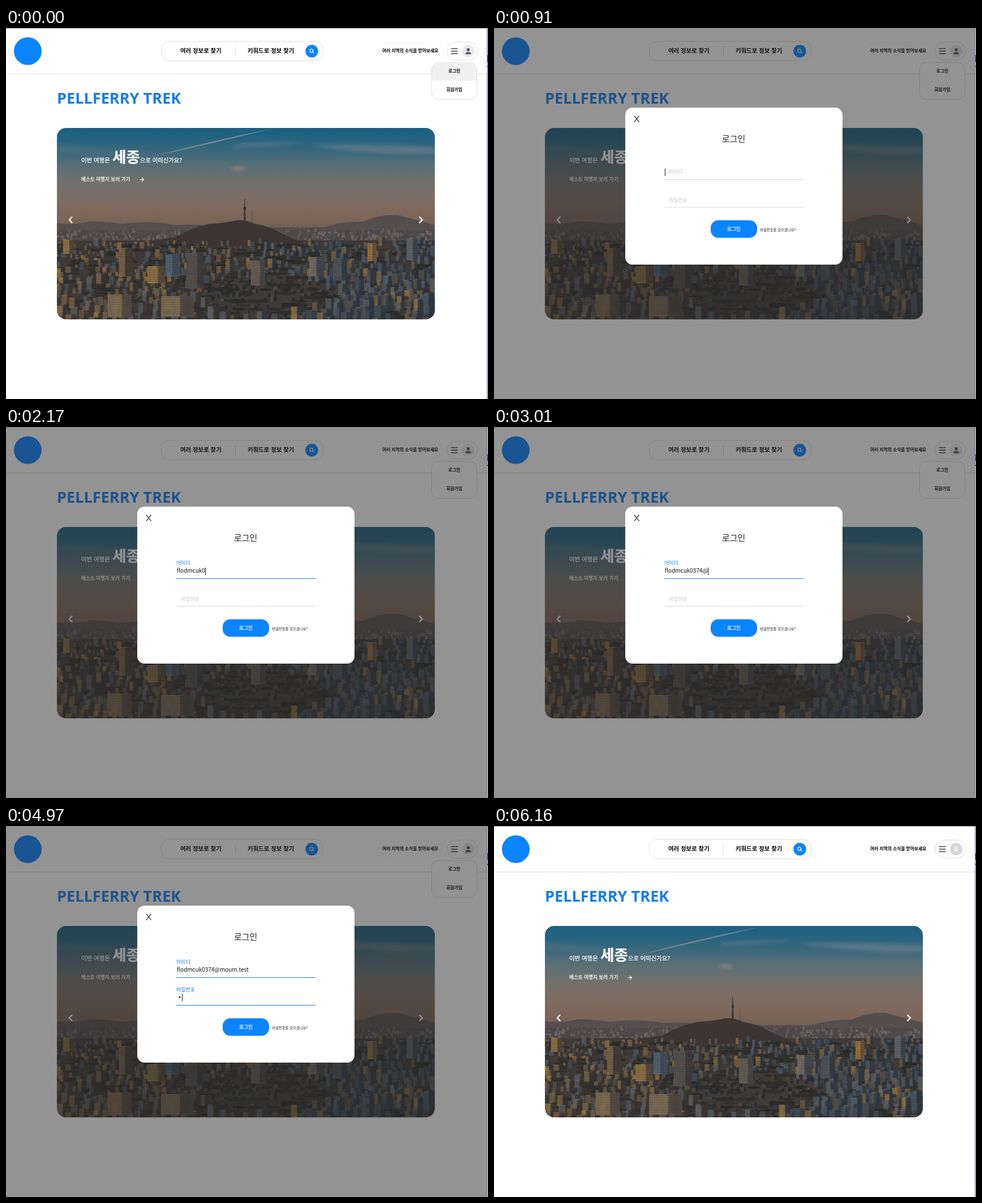
An HTML page with a canvas for the animation above (6230 ms loop, 852 by 657 pixels).

```html
<!DOCTYPE html>
<html lang="ko">
<head>
<meta charset="utf-8">
<style>
html, body { margin: 0; width: 100%; height: 100%; overflow: hidden; background: #fff; }
canvas { position: absolute; left: 90px; top: 177px; border-radius: 16px; }
svg { position: absolute; left: 0; top: 0; font-family: "Noto Sans CJK KR", "Noto Sans", sans-serif; }
.box { fill: #fff; stroke: #dedede; }
.mid { text-anchor: middle; }
.b { font-weight: 700; }
.m { stroke: #000; stroke-width: .25px; }
.white { fill: #fff; }
.white.m { stroke: #fff; }
.line { fill: none; stroke-linecap: round; stroke-linejoin: round; }
</style>
</head>
<body>
<canvas id="photo" width="668" height="339"></canvas>
<svg width="852" height="657" viewBox="0 0 852 657">
  <!-- header -->
  <path d="M0 81.5H850" stroke="#dcdcdc"/>
  <circle cx="38.5" cy="41" r="24.5" fill="#0a84ff"/>
  <rect class="box" x="274.5" y="23.5" width="286" height="34.5" rx="14"/>
  <path d="M405.5 32V50" stroke="#dcdcdc"/>
  <g class="b" font-size="10.4">
    <text x="308" y="44">여러 정보로 찾기</text>
    <text x="427" y="44">키워드로 정보 찾기</text>
  </g>
  <circle cx="540.5" cy="41" r="11.2" fill="#0a84ff"/>
  <g class="line" stroke="#fff" stroke-width="1.2">
    <circle cx="539.8" cy="40.2" r="2.9"/><path d="M542 42.4L544.3 44.7"/>
  </g>
  <rect x="656.5" y="26.5" width="115" height="29" rx="14" fill="#fff" stroke="#f7f7f7"/>
  <text class="b" x="665" y="43.3" font-size="7.75">여러 지역의 소식을 받아보세요</text>
  <rect class="box" x="779.5" y="25" width="54" height="32" rx="16"/>
  <path class="line" d="M787 36.5H798M787 41H798M787 45.5H798" stroke="#40404a" stroke-width="1.3"/>
  <circle id="avatar" cx="817" cy="41" r="11"/>
  <g id="guest" fill="#55555f">
    <circle cx="817" cy="38.4" r="2.7"/>
    <path d="M812.2 46.5v-1.3q0-2.8 4.8-2.8t4.8 2.8v1.3z"/>
  </g>
  <text id="member" class="mid b white" x="817" y="44.2" font-size="8.5">봄</text>
  <g id="menu">
    <rect class="box" x="752.5" y="61" width="80" height="65.5" rx="12"/>
    <path id="hover" d="M753 93V73q0-11.5 11.5-11.5h56q11.5 0 11.5 11.5V93z" fill="#f0f0f0"/>
    <g class="mid b" font-size="7.6">
      <text x="792.5" y="79.4">로그인</text><text x="792.5" y="112.2">회원가입</text>
    </g>
  </g>

  <!-- hero -->
  <text class="b" x="90" y="133.5" font-size="27.1" fill="#147cec" style="font-family:'Noto Sans',sans-serif">PELLFERRY TREK</text>
  <g class="white m">
    <text x="133" y="237.7" font-size="10.4">이번 여행은</text>
    <text class="b" x="188" y="238" font-size="26.7">세종</text>
    <text x="237" y="237.7" font-size="10.3">으로 어떠신가요?</text>
    <text x="133" y="271.3" font-size="8.6">베스트 여행지 보러 가기</text>
  </g>
  <g class="line" stroke="#fff">
    <path d="M237 268.5H243M240.5 265.7L243.3 268.5L240.5 271.3" stroke-width="1.2"/>
    <path d="M116.5 335L111.7 339.8L116.5 344.6M731.2 335L736 339.8L731.2 344.6" stroke-width="2.2"/>
  </g>

  <!-- login dialog -->
  <g id="dialog">
    <rect y="1" width="850" height="656" fill="#282828" opacity=".5"/>
    <rect x="232" y="141" width="384" height="278" rx="13" fill="#fff"/>
    <path d="M248 155.5L256.5 166.5M256.5 155.5L248 166.5" stroke="#444" stroke-width="1.4"/>
    <text class="mid" x="423.7" y="201.5" font-size="15" fill="#222">로그인</text>
    <path id="rule0" d="M301 268.4H547"/>
    <path id="rule1" d="M301 317.4H547"/>
    <text id="label0" font-size="9.1">아이디</text>
    <text id="label1" font-size="9">비밀번호</text>
    <text id="mail" x="302" y="258.3" font-size="10" fill="#111"></text>
    <g id="dots" fill="#111"></g>
    <path id="caret" stroke="#111"/>
    <rect x="383" y="340.5" width="82" height="31" rx="13.5" fill="#0a84ff"/>
    <text class="mid m white" x="424" y="358.7" font-size="8.7">로그인</text>
    <text x="470" y="360.4" font-size="6.4" fill="#222">비밀번호를 잊으셨나요?</text>
  </g>

  <!-- window edges -->
  <path d="M0 .5H852" stroke="#8e8e8e"/>
  <path d="M850.5 1V657" stroke="#756f80"/>
  <path d="M851.5 1V657" stroke="#d3cfd9"/>
  <path d="M851.5 48V60M851.5 67V69" stroke="#44404c"/>
</svg>
<script>
const $ = id => document.getElementById(id);

function paintPhoto() {
  const c = $('photo').getContext('2d');
  let seed = 11;
  const rnd = () => (seed = (seed * 16807) % 2147483647) / 2147483647;
  const pick = list => list[Math.floor(rnd() * list.length)];
  const rect = (x, y, w, h, color) => { c.fillStyle = color; c.fillRect(x, y, w, h); };
  const shape = (d, color) => { c.fillStyle = color; c.fill(new Path2D(d)); };
  c.translate(-90, -177);

  const sky = c.createLinearGradient(0, 177, 0, 365);
  ['#1d6081', '#28647f', '#40697b', '#5d6f75', '#70706d', '#7b6e66', '#7f6a5d', '#796456', '#665852']
    .forEach((color, i) => sky.addColorStop(i / 8, color));
  rect(90, 177, 668, 339, sky);

  // clouds and vapour trail
  c.filter = 'blur(3px)';
  shape('M540 208Q610 204 758 211V222Q690 226 640 219Q590 217 540 208Z', 'rgba(125,136,146,.5)');
  shape('M400 207Q460 200 530 203Q470 210 400 212Z', 'rgba(120,134,146,.45)');
  shape('M396 249Q410 240 424 250Q412 256 396 249Z', 'rgba(150,138,128,.7)');
  shape('M90 206Q180 215 300 223Q170 228 90 219Z', 'rgba(95,118,132,.35)');
  c.filter = 'none';
  shape('M250 230Q360 200 468 179Q370 203 250 230Z', '#7c878f');

  // distant ridges and haze
  shape('M90 346Q120 350 150 342Q180 343 205 347Q250 340 300 349Q350 347 400 353L560 353Q595 342 632 343Q662 329 692 331Q720 338 758 349V375H90Z', '#554e4e');
  rect(90, 358, 668, 160, '#4d4848');
  for (let i = 0; i < 420; i++) {
    const h = 2 + rnd() * 6;
    rect(90 + rnd() * 668, 378 - h - rnd() * 17, 2 + rnd() * 3, h, pick(['#625b5a', '#585253', '#6b6462', '#4d494a']));
  }
  rect(90, 376, 668, 140, '#3d3a38');

  // hill and tower
  shape('M180 386Q250 380 300 370Q328 353 360 347Q390 345 405 341Q423 338 440 347Q468 351 488 364Q510 376 550 386Z', '#3c3533');
  shape('M421.6 302h.8l.5 15h1.4v5h-1l.5 19h-3.6l.5-19h-1v-5h1.4z', '#393537');
  rect(435, 323, .8, 24, '#514848');

  function tower(x, base, w, h, lit, dark) {
    const side = w * (.35 + rnd() * .25), top = base - h;
    rect(x, top, w - side, h, lit);
    rect(x + w - side, top, side, h, dark);
    c.fillStyle = 'rgba(25,27,32,.33)';
    for (let y = top + 2; y < base - 1; y += 3) c.fillRect(x + 1, y, w - 2, 1);
  }

  const warm = ['#8d7042', '#a38046', '#776346', '#846b4d', '#66594b'];
  const cool = ['#57606a', '#62646a', '#4b5661', '#6b6864', '#5c564f'];
  c.globalAlpha = .7;
  for (let y = 386; y < 540; y += 7) {
    const near = (y - 380) / 150;
    for (let x = 84 + rnd() * 8; x < 758;) {
      const w = 5 + near * 9 + rnd() * 8, right = (x - 90) / 668;
      const park = ((x - 455) / 120) ** 2 + ((y - 482) / 40) ** 2 < 1;
      const gold = rnd() > .35 + right * .6;
      if (rnd() > .42) {
        if (park) tower(x, y, w * .7, 3 + rnd() * 5, pick(['#4b4541', '#5b5148', '#3f3e40']), '#2b2928');
        else tower(x, y, w, w * (.5 + near * .3 + rnd() * (.5 + right * .6)), pick(gold ? warm : cool), right < .5 ? '#3d3733' : '#303a44');
      }
      x += w * (.8 + rnd() * .5);
    }
    // dark tree patches
    for (let i = 0; i < 22; i++) {
      c.fillStyle = pick(['#2b2a27', '#302d29', '#272a2b']);
      c.beginPath();
      c.ellipse(90 + rnd() * 668, y, 5 + rnd() * 13, 2 + rnd() * 3, 0, 0, 7);
      c.fill();
    }
  }

  // landmark blocks: x, base, width, height, lit, shade
  c.globalAlpha = .85;
  [[282, 440, 25, 39, '#536a78', '#43525e'], [318, 461, 32, 62, '#595552', '#3e3b3b'],
   [250, 452, 31, 30, '#9a7a45', '#5c4c3b'], [200, 440, 25, 50, '#80694b', '#453c37'],
   [639, 413, 16, 32, '#a97939', '#76583b'], [708, 411, 20, 38, '#66686a', '#3d464f'],
   [536, 440, 27, 34, '#78736d', '#464b51'], [433, 456, 25, 44, '#6d655c', '#494747'],
   [578, 447, 25, 40, '#515860', '#343b43'], [180, 512, 42, 40, '#867155', '#574d43'],
   [274, 511, 58, 36, '#857259', '#534a42'], [101, 400, 20, 25, '#9a7b44', '#584836']]
    .forEach(b => tower(...b));
}

const LOOP = 6230, MAIL = 'flodmcuk0374@moum.test';
const keyTimes = [1190, 1330, 1470, 1610, 1890, 1960, 1960, 2030, 2170, 2380, 2520,
  2730, 3010, 3150, 3290, 3500, 3780, 3850, 3990, 4130, 4270, 4340];
const dotTimes = [4970, 5040, 5040, 5180];
const countUntil = (times, t) => times.filter(x => x <= t).length;
const mix = (a, b, p) => `rgb(${a.map((v, i) => Math.round(v + (b[i] - v) * p))})`;
const show = (id, on) => $(id).style.display = on ? '' : 'none';
const blue = [32, 120, 222];

// Floats a field's label up and tints its underline.
function field(i, t, start) {
  const q = Math.max(0, Math.min(1, (t - start) / 240)), p = q * q * (3 - 2 * q);
  const label = $('label' + i);
  label.setAttribute('x', 309 - 8 * p);
  label.setAttribute('y', 259 + 48.7 * i - 15 * p);
  label.setAttribute('fill', mix([200, 200, 200], blue, p));
  $('rule' + i).setAttribute('stroke', mix([220, 220, 220], blue, p));
}

function draw(now) {
  const t = Math.floor((now % LOOP) / 70) * 70;
  const open = t >= 70 && t < 6160, done = t >= 6160;
  show('dialog', open);
  show('menu', !done);
  show('hover', t < 70);
  show('guest', !done);
  show('member', done);
  $('avatar').setAttribute('fill', done ? '#d6d6d8' : '#e9e9ee');
  if (!open) return;

  field(0, t, 870);
  field(1, t, 4580);
  $('mail').textContent = MAIL.slice(0, countUntil(keyTimes, t));
  const dots = countUntil(dotTimes, t);
  [...$('dots').children].forEach((d, i) => d.style.display = i < dots ? '' : 'none');
  const second = t >= 4620;
  const x = 302 + (second ? dots * 9.4 : $('mail').getComputedTextLength());
  $('caret').setAttribute('d', `M${Math.round(x) + .5} ${second ? 297 : 249}v13`);
  show('caret', t >= 910 && t < 5950);
}

for (let i = 0; i < 4; i++)
  $('dots').innerHTML += `<circle cx="${307 + i * 9.4}" cy="303.2" r="1.4"/>`;
paintPhoto();
const began = performance.now();
(function tick() {
  draw(performance.now() - began);
  requestAnimationFrame(tick);
})();
</script>
</body>
</html>
```
